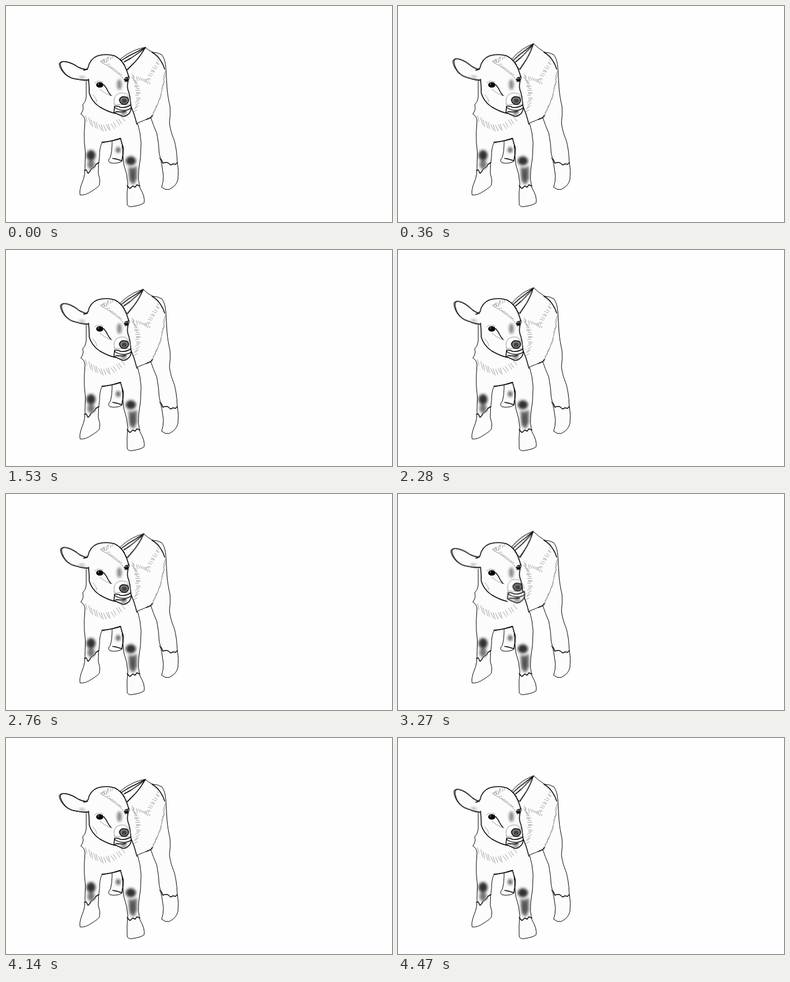
Recreate the animation shown at these times as an HTML page. Size 640x360 px, loop 4.5 s.

```html
<!DOCTYPE html>
<html lang="en">
<head>
<meta charset="utf-8">
<title>Goat kid</title>
<style>
html, body { margin: 0; width: 100%; height: 100%; overflow: hidden; background: #fefefe; }
svg { display: block; width: 100vw; height: 100vh; }
path, ellipse { stroke-linecap: round; stroke-linejoin: round; }
.skin { fill: #fcfcfc; stroke: #111; stroke-width: 1; }
.line { fill: none; stroke: #111; stroke-width: 1.5; }
.thin { fill: none; stroke: #777; stroke-width: .7; }
.hair { fill: none; stroke: #888; stroke-width: .75; }
.smudge { filter: url(#blur); }
.ear, .back, .muzzle, .open, .shut { animation: 4.5s linear infinite; }
.left { transform-origin: 134px 117px; animation-name: left; }
.right { transform-origin: 197px 100px; animation-name: right; }
.back { animation-name: back; }
.muzzle { animation-name: sniff; }
.open { animation-name: open; animation-timing-function: step-end; }
.shut { opacity: 0; animation-name: shut; animation-timing-function: step-end; }
@keyframes left {
  0%, 1.3% { transform: rotate(0deg); }
  6% { transform: rotate(3deg); }
  10% { transform: rotate(11deg); }
  19.3%, 25% { transform: rotate(9deg); }
  30% { transform: rotate(2deg); }
  34% { transform: rotate(5deg); }
  42%, 50.7% { transform: rotate(11deg); }
  58% { transform: rotate(2deg); }
  66% { transform: rotate(10deg); }
  72.7% { transform: translate(-1px, -1px) rotate(1deg); }
  80% { transform: rotate(10deg); }
  92% { transform: rotate(0deg); }
  97% { transform: rotate(2deg); }
  99.3%, 100% { transform: rotate(11deg); }
}
@keyframes right {
  0%, 1.3%, 58%, 92%, 96% { transform: rotate(0deg) scale(1); }
  8%, 42%, 50.7%, 66%, 80%, 99.3%, 100% { transform: rotate(-11deg) scale(1); }
  72.7% { transform: rotate(-12deg) scale(1.01); }
  14%, 24% { transform: rotate(-14deg) scale(.95); }
  34% { transform: rotate(-6deg) scale(1); }
}
@keyframes back {
  0%, 1.3%, 58%, 92%, 96% { d: path("M231 69Q236 74 243 77"); }
  8%, 42%, 50.7%, 66%, 72.7%, 80%, 99.3%, 100% { d: path("M225 63Q233 71 243 77"); }
  14%, 24% { d: path("M221 64Q231 72 243 77"); }
  34% { d: path("M228 66Q234 73 243 77"); }
}
@keyframes sniff {
  0%, 66%, 80%, 100% { transform: none; }
  72.7% { transform: translate(2.5px, -2.5px); }
}
@keyframes open { 0%, 21.4% { opacity: 1; } 17.4% { opacity: 0; } }
@keyframes shut { 0%, 21.4% { opacity: 0; } 17.4% { opacity: 1; } }
</style>
</head>
<body>
<svg viewBox="0 0 640 360">
  <defs><filter id="blur" x="-50%" y="-50%" width="200%" height="200%"><feGaussianBlur stdDeviation="2.3"/></filter></defs>

  <!-- inner leg -->
  <path class="skin" stroke-width=".7" d="M176 225Q176 242 173 252Q168 258 172 261Q182 264 192 259Q196 240 190 221"/>
  <path class="line" d="M177 254Q185 255 192 258Q197 240 190 221"/>
  <ellipse class="smudge" cx="186" cy="240" rx="4" ry="5" fill="#666"/>

  <!-- body -->
  <path class="skin" d="M133 125Q133 140 133 152Q132 160 127 165Q130 172 124 180Q131 184 131 192Q129 212 130 228
    Q133 246 131 264Q132 282 126 295Q121 308 123 315Q132 316 143 308Q153 302 155 298Q157 289 153 279
    Q153 262 155 251Q155 236 159 228Q174 226 190 220Q192 228 195 237Q193 250 195 263Q201 280 202 296
    Q200 312 201 331Q203 336 211 334Q224 332 229 328Q231 318 222 303Q218 288 220 274Q224 253 224 228
    Q223 210 218 195Q228 191 240 186Q244 198 250 212Q253 226 254 245Q259 265 261 283Q261 294 258 302
    Q264 307 270 306Q283 300 285 289Q287 274 284 260Q283 238 279 224Q272 207 271 194Q273 182 272 168
    Q268 150 267 137Q266 120 265 103Q264 88 258 81Q250 77 243 77"/>
  <path class="skin back" d="M231 69Q236 74 243 77"/>
  <path class="line" d="M207 167Q212 177 217 197M159 227Q174 226 190 221M242 77Q252 83 257 92Q261 98 263 105M233 189L240 186M240 186L243 182"/>
  <path class="line" d="M130 274L133 273L136 279Q139 277 141 272L147 268L149 264L154 261M201 299Q204 304 206 304L210 300L214 302L217 298L222 300"/>
  <path class="line" stroke-width="1.2" d="M255 254Q258 255 260 262Q264 260 268 261L273 265L277 263L281 264L284 261"/>
  <g class="smudge">
    <ellipse cx="141" cy="249" rx="7.5" ry="9" fill="#333"/>
    <ellipse cx="141" cy="264" rx="6" ry="8" fill="#777"/>
    <ellipse cx="207" cy="258" rx="8.5" ry="7.5" fill="#333"/>
    <path d="M203 268Q211 272 217 266L217 288L212 298L205 293Z" fill="#666"/>
    <ellipse cx="209" cy="282" rx="5" ry="8" fill="#555"/>
  </g>
  <path class="hair" id="fur"/>

  <!-- right ear -->
  <g class="ear right">
    <path class="skin" d="M190 88Q201 79 213 74Q223 70 231 69Q224 81 215 92Q209 99 201 107Z"/>
    <path class="line" d="M191 91Q204 82 218 76Q226 72 231 69Q224 82 215 92Q208 99 201 106"/>
    <path class="line" stroke-width="1" d="M231 70Q216 81 207 87Q200 91 196 93"/>
  </g>

  <!-- left ear -->
  <g class="ear left">
    <path class="skin" stroke-width="1.5" d="M137 106Q128 106 120 102Q110 95 100 93Q91 91 88 96Q88 104 98 114Q106 121 118 122Q128 125 137 124"/>
    <path class="line" d="M136 106Q128 106 120 102Q110 95 100 93Q92 91 90 96Q90 104 98 113Q106 121 118 122Q128 124 137 123"/>
    <ellipse class="smudge" cx="126" cy="119" rx="5" ry="2" fill="#aaa"/>
  </g>

  <!-- head -->
  <path fill="#fcfcfc" d="M137 124L134 112L136 103Q139 88 152 83Q166 79 180 83Q192 91 197 100Q204 113 203 126Q201 138 206 152L208 168L196 180L176 178Q139 163 139 146Z"/>
  <path class="line" stroke-width="1" d="M129 107Q134 106 136 103Q139 88 152 83Q166 79 180 83Q190 88 196 98"/>
  <path class="line" d="M137 122Q138 134 138 145Q142 159 155 168Q168 176 181 179M194 95Q200 104 204 120Q200 131 202 139Q206 149 207 166M204 117L196 123"/>
  <path class="thin" d="M156 92Q172 101 185 112Q194 118 198 128M147 128Q153 123 161 127M156 139Q165 147 176 150M144 148Q150 154 151 160"/>
  <ellipse class="smudge" cx="188" cy="131" rx="4" ry="9" fill="#888"/>
  <path class="hair" id="brow"/>
  <path class="line" d="M162 131Q167 137 169 142Q171 146 174 149"/>
  <g class="open">
    <ellipse cx="155.500" cy="131.500" rx="6" ry="4.500" fill="#080808"/>
    <ellipse cx="199.500" cy="122.500" rx="3" ry="4" fill="#111"/>
    <circle cx="153.500" cy="130" r=".9" fill="#aaa"/>
    <circle cx="199" cy="121" r=".9" fill="#ddd"/>
  </g>
  <path class="line shut" stroke-width="2" d="M151 134Q156 136 162 132M197 126L203 122"/>

  <!-- muzzle -->
  <g class="muzzle">
    <path class="thin" d="M180 164Q177 154 183 148Q190 143 199 146Q205 150 207 160M179 164Q193 165 207 164"/>
    <path fill="#777" stroke="#111" stroke-width="1.500" d="M188 157Q189 152 194 151L201 152Q204 155 203 159Q201 164 196 164Q190 164 188 157Z"/>
    <ellipse cx="196" cy="158" rx="4" ry="3.500" fill="#444"/>
    <path class="skin" style="stroke-width:1.500" d="M180 167Q185 166 190 169Q199 170 207 165Q209 172 205 178Q200 184 194 184Q184 180 179 177Z"/>
    <ellipse class="smudge" cx="195" cy="179" rx="5" ry="2.500" fill="#666"/>
    <path class="line" d="M180 169Q187 174 195 174Q203 174 207 170M182 176Q190 177 199 176"/>
  </g>
</svg>
<script>
let seed = 7;
const rnd = () => (seed = seed * 16807 % 2147483647) / 2147483647 - .5;

// Short strokes along a quadratic curve; the angle turns from a0 to a1.
function hairs(x0, y0, cx, cy, x1, y1, n, len, a0, a1) {
  let d = '';
  for (let i = 0; i < n; i++) {
    const t = i / (n - 1), u = 1 - t;
    const x = u * u * x0 + 2 * u * t * cx + t * t * x1 + rnd() * 2;
    const y = u * u * y0 + 2 * u * t * cy + t * t * y1 + rnd() * 2;
    const a = (a0 + (a1 - a0) * t + rnd() * 16) * Math.PI / 180;
    const l = len * (1 + rnd() * .5);
    d += `M${x.toFixed(1)} ${y.toFixed(1)}l${(l * Math.cos(a)).toFixed(1)} ${(l * Math.sin(a)).toFixed(1)}`;
  }
  return d;
}

document.getElementById('fur').setAttribute('d',
  hairs(133, 182, 160, 213, 191, 184, 15, 11, 80, 55) +
  hairs(208, 118, 220, 140, 213, 176, 19, 6, 40, -40) +
  hairs(209, 114, 222, 120, 236, 125, 9, 6, 75, 50) +
  hairs(237, 124, 248, 108, 255, 93, 11, 6, 190, 225) +
  hairs(264, 108, 262, 145, 244, 178, 20, 7, 115, 105));
document.getElementById('brow').setAttribute('d',
  hairs(158, 91, 166, 86, 176, 83, 8, 5, 60, 110) +
  hairs(158, 92, 175, 102, 188, 114, 9, 4, -10, 20));
</script>
</body>
</html>
```
